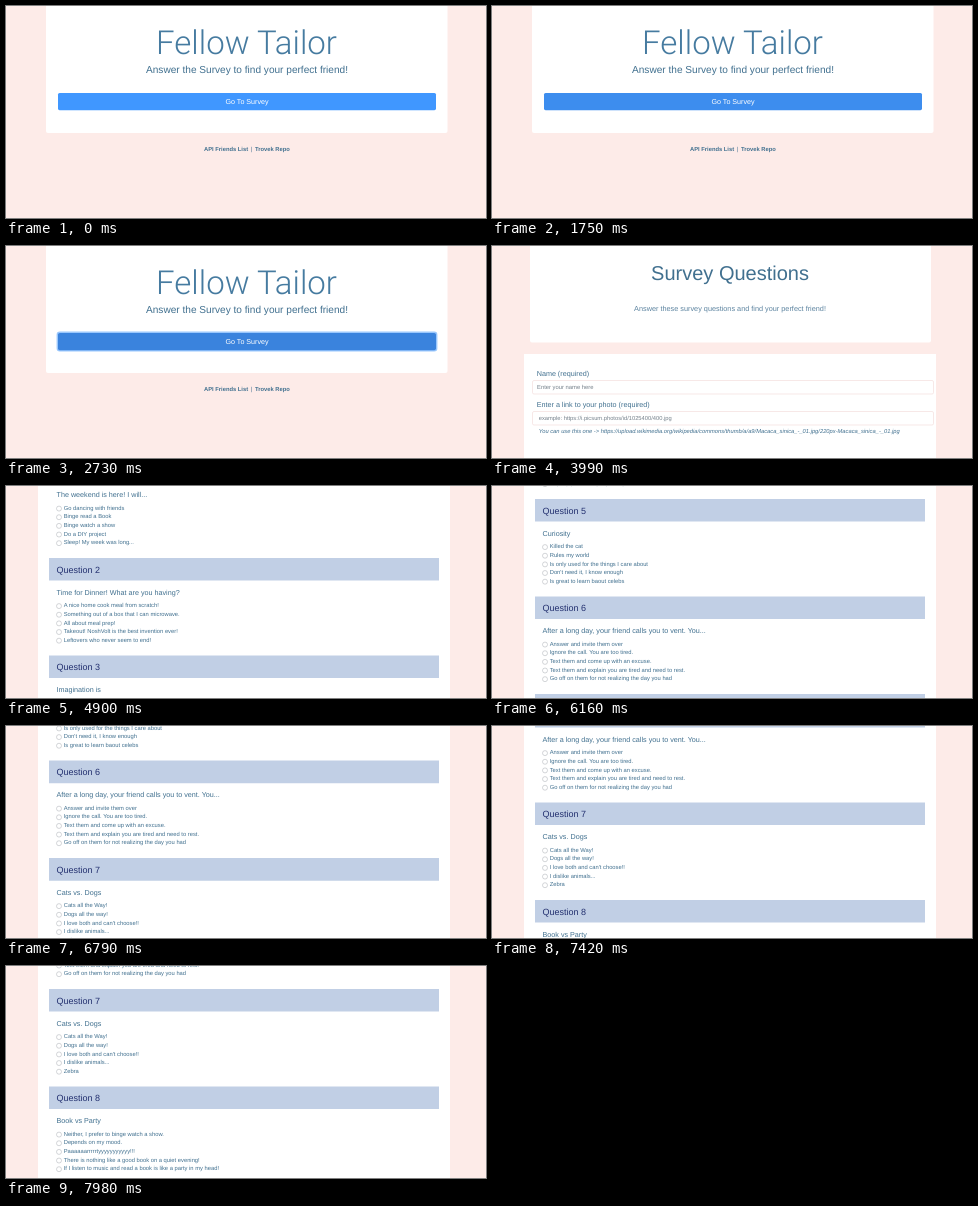
An HTML page with a canvas for the animation above (8 s loop, 480 px wide and 212 px high).

```html
<!DOCTYPE html>
<html lang="en">
<head>
<meta charset="utf-8">
<title>Friend survey</title>
<style>
  html, body { margin: 0; width: 100%; height: 100%; overflow: hidden; background: #fdebe8; }
  canvas { display: block; }
</style>
</head>
<body>
<canvas id="stage" width="480" height="212"></canvas>
<script>
const ctx = document.getElementById('stage').getContext('2d');
ctx.textRendering = 'geometricPrecision';

const LOOP = 8000, TICK = 70, SURVEY_AT = 2870;
const SANS = '"Liberation Sans", Arial, sans-serif';
const BLUE = '#41708f', PLACEHOLDER = '#75818b';
const FIRST_QUESTION = 216, QUESTION_STEP = 97.5;

// Trackpad gestures: start time, end time, scroll offset reached
const gestures = [
  [3990, 4480, 153.6], [4690, 5110, 289.6], [5180, 5670, 532.9], [5950, 6370, 625.9],
  [6580, 7070, 701.7], [7280, 7700, 751.7], [7840, 8260, 809.4]
];

const questions = [
  ['The weekend is here! I will...', 'Go dancing with friends', 'Binge read a Book',
    'Binge watch a show', 'Do a DIY project', 'Sleep! My week was long...'],
  ['Time for Dinner! What are you having?', 'A nice home cook meal from scratch!',
    'Something out of a box that I can microwave.', 'All about meal prep!',
    'Takeout! NoshVolt is the best invention ever!', 'Leftovers who never seem to end!'],
  ['Imagination is', 'More important than knowledge', 'Only for children',
    'Where I spend most of my day', 'A nice place to visit', 'Not really my thing'],
  ['Your perfect vacation is', 'Relaxing at the beach', 'Hiking up a mountain',
    'Exploring a new city', 'Staying home with a movie', 'Any trip planned by my family'],
  ['Curiosity', 'Killed the cat', 'Rules my world', 'Is only used for the things I care about',
    "Don't need it, I know enough", 'Is great to learn baout celebs'],
  ['After a long day, your friend calls you to vent. You...', 'Answer and invite them over',
    'Ignore the call. You are too tired.', 'Text them and come up with an excuse.',
    'Text them and explain you are tired and need to rest.',
    'Go off on them for not realizing the day you had'],
  ['Cats vs. Dogs', 'Cats all the Way!', 'Dogs all the way!', "I love both and can't choose!!",
    'I dislike animals...', 'Zebra'],
  ['Book vs Party', 'Neither, I prefer to binge watch a show.', 'Depends on my mood.',
    'Paaaaaarrrrrtyyyyyyyyyyy!!!', 'There is nothing like a good book on a quiet evening!',
    'If I listen to music and read a book is like a party in my head!']
];

const clamp = v => Math.min(1, Math.max(0, v));
const ease = p => 1 - (1 - p) ** 1.5;

function scrollAt(t) {
  let y = 0;
  for (const [start, end, target] of gestures)
    y += (target - y) * ease(clamp((t - start) / (end - start)));
  return y;
}

// y is the middle of the capitals
function text(str, x, y, size, { color = BLUE, align = 'left', style = '', family = SANS } = {}) {
  ctx.font = `${style} ${size}px ${family}`;
  ctx.fillStyle = color;
  ctx.textAlign = align;
  ctx.fillText(str, x, y + size * 0.36);
}

function box(x, y, w, h, { fill, stroke, radius = 0, line = 0.6 } = {}) {
  ctx.beginPath();
  ctx.roundRect(x, y, w, h, radius);
  if (fill) { ctx.fillStyle = fill; ctx.fill(); }
  if (stroke) { ctx.strokeStyle = stroke; ctx.lineWidth = line; ctx.stroke(); }
}

function drawHome(t) {
  const hover = clamp((t - 1680) / 140), focus = clamp((t - 2450) / 280);
  const mix = (a, b) => Math.round(a + (b - a) * hover);
  box(40, -5, 401.5, 132, { fill: '#fff', radius: 2 });
  text('Fellow Tailor', 240.5, 36, 33, { color: '#467ba0', align: 'center', style: '300', family: 'Roboto, sans-serif' });
  text('Answer the Survey to find your perfect friend!', 241, 63.5, 10.1, { align: 'center' });
  if (focus) box(51.4, 86.4, 379.2, 18.4, { stroke: `rgba(100,170,250,${0.65 * focus})`, radius: 2.5, line: 1.6 });
  box(52, 87, 378, 17.2, { fill: `rgb(${mix(64, 58)},${mix(151, 131)},${mix(255, 221)})`, radius: 1.6 });
  text('Go To Survey', 241, 95.5, 7.15, { color: '#fff', align: 'center' });
  text('API Friends List', 198, 143, 5.8, { style: 'bold' });
  text('|', 245.5, 143, 5.8, { align: 'center' });
  text('Trovek Repo', 249, 143, 5.8, { style: 'bold' });
}

function drawQuestion([prompt, ...options], index, top) {
  box(43, top, 390, 22.6, { fill: '#c1cfe5' });
  text(`Question ${index + 1}`, 50.5, top + 11.3, 9, { color: '#23306f' });
  text(prompt, 50.5, top + 34, 7.2);
  options.forEach((option, i) => {
    const y = top + 47.2 + i * 8.65;
    box(50.5, y - 1.6, 5, 5, { fill: '#fff', stroke: '#a9adb2', radius: 2.5, line: 0.5 });
    text(option, 57.7, y, 5.8);
  });
}

function drawSurvey(scroll) {
  ctx.save();
  ctx.translate(0, -scroll);
  box(38, -5, 401, 101.5, { fill: '#fff', radius: 2 });
  text('Survey Questions', 238, 27, 20, { align: 'center' });
  text('Answer these survey questions and find your perfect friend!', 238, 62, 7.3, { color: '#5d84a0', align: 'center' });

  box(32, 108, 412, 1000, { fill: '#fff' });
  text('Name (required)', 44.7, 127, 7.2);
  box(40.5, 134.5, 401, 13.5, { stroke: '#f1d9d7', radius: 1.5 });
  text('Enter your name here', 45, 141, 5.85, { color: PLACEHOLDER });
  text('Enter a link to your photo (required)', 44.7, 158, 7.2);
  box(40.5, 165.5, 401, 13.5, { stroke: '#f1d9d7', radius: 1.5 });
  text('example: https://i.picsum.photos/id/1025400/400.jpg', 46.7, 172, 5.78, { color: PLACEHOLDER });
  text('You can use this one -> https://upload.wikimedia.org/wikipedia/commons/thumb/a/a9/Macaca_sinica_-_01.jpg/220px-Macaca_sinica_-_01.jpg',
    46.7, 184.6, 5.78, { style: 'italic' });

  questions.forEach((q, i) => drawQuestion(q, i, FIRST_QUESTION + i * QUESTION_STEP));
  ctx.restore();
}

function frame() {
  const t = Math.floor(performance.now() % LOOP / TICK) * TICK;
  box(0, 0, 480, 212, { fill: '#fdebe8' });
  if (t < SURVEY_AT) drawHome(t);
  else drawSurvey(scrollAt(t));
  requestAnimationFrame(frame);
}
frame();
</script>
</body>
</html>
```
